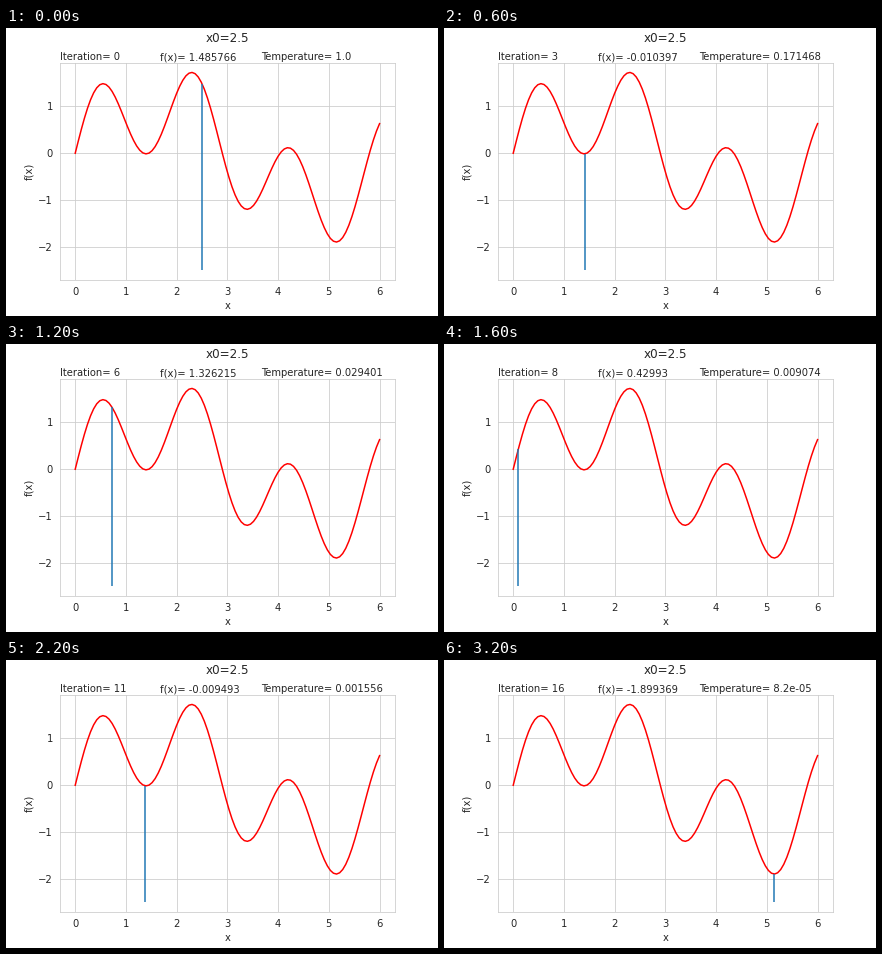
Recreate the animation shown at these times as a matplotlib script. Size 432 by 288 pixels, loop 3400 ms.

```python
import numpy as np
import matplotlib.pyplot as plt
from matplotlib.animation import FuncAnimation

INK, PALE = "0.15", "0.8"
FLOOR = -2.5
COOLING = 5 / 9

plt.rcParams.update({
    "font.family": "DejaVu Sans",
    "font.size": 10,
    "text.color": INK,
    "axes.labelcolor": INK,
    "axes.edgecolor": PALE,
    "axes.axisbelow": True,
    "axes.grid": True,
    "grid.color": PALE,
    "xtick.color": INK,
    "ytick.color": INK,
    "xtick.bottom": False,
    "ytick.left": False,
})


def f(x):
    return np.sin(x) + np.sin(10 * x / 3)


def slope(x):
    return np.cos(x) + 10 / 3 * np.cos(10 * x / 3)


def solve(guess, value):
    """Newton search for the x near guess where f(x) equals value."""
    x = guess
    for _ in range(8):
        x -= (f(x) - value) / slope(x)
    return x


# Accepted position after each cooling step of the annealing run.
path = [
    2.5, 1.9, 1.65, solve(1.423, -0.010397), 1.0, solve(0.644, 1.439245),
    0.725, 1.0, solve(0.1007, 0.42993), 1.17, solve(1.277, 0.059046),
    1.37, 3.1, solve(3.416, -1.195457), 4.86, 5.0, solve(5.139, -1.899369),
]

fig, ax = plt.subplots(figsize=(6, 4), dpi=72)
fig.subplots_adjust(left=0.125, right=0.9, bottom=0.125, top=0.88)

xs = np.linspace(0, 6, 100)
ax.plot(xs, f(xs), color="r", lw=1.5)
marker = ax.vlines(path[0], FLOOR, f(path[0]), colors="tab:blue", lw=1.5, zorder=3)
ax.set_title("x0=2.5\n", fontsize=12)
ax.set_xlabel("x")
ax.set_ylabel("f(x)")
ax.autoscale_view()
ax.set_autoscale_on(False)

labels = [ax.text(left, 1.01, "", transform=ax.transAxes) for left in (0, 0.3, 0.6)]


def update(step):
    x = path[step]
    marker.set_segments([[(x, FLOOR), (x, f(x))]])
    labels[0].set_text(f"Iteration= {step}")
    labels[1].set_text(f"f(x)= {round(float(f(x)), 6)}")
    labels[2].set_text(f"Temperature= {round(COOLING ** step, 6)}")
    return marker, *labels


anim = FuncAnimation(fig, update, frames=len(path), interval=200,
                     repeat=True, repeat_delay=0)
plt.show()
```
